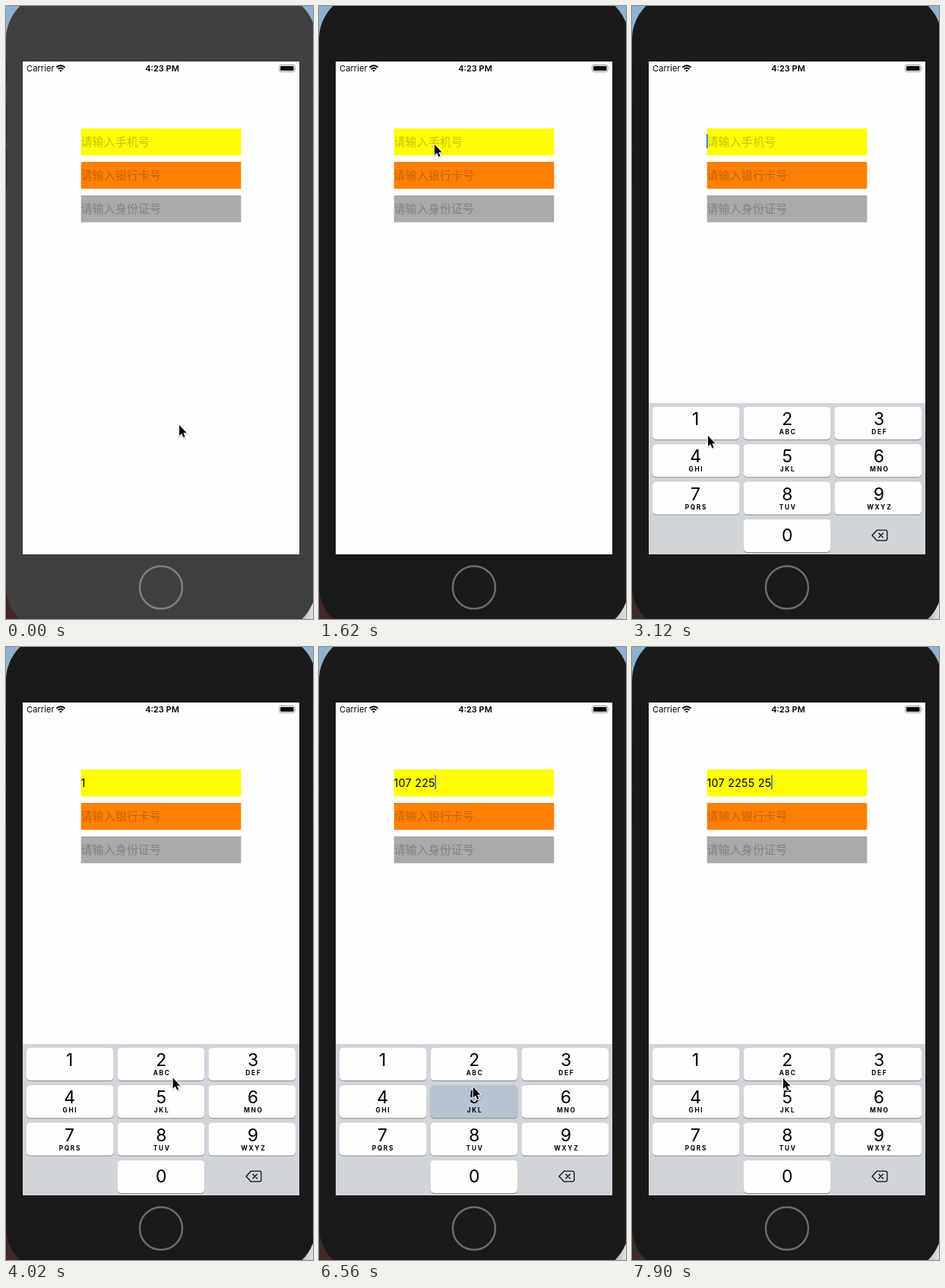
An HTML page for the animation above (8000 ms loop, 404x806 px).

```html
<!DOCTYPE html>
<html lang="zh">
<head>
<meta charset="utf-8">
<title>Number pad</title>
<style>
html, body { margin: 0; width: 100%; height: 100%; overflow: hidden; background: #404040; }
svg { display: block; width: 100vw; height: 100vh; }
text { font-family: Inter, Roboto, sans-serif; white-space: pre; }
.hint { font: 300 15.1px "Noto Sans CJK SC", "Noto Sans CJK", sans-serif; fill: #000019; fill-opacity: .24; }
.digit { font-size: 23px; text-anchor: middle; }
.letters { font-size: 8.3px; font-weight: 700; letter-spacing: 1.7px; text-anchor: middle; }
</style>
</head>
<body>
<svg id="stage" viewBox="0 0 404 806">
  <defs>
    <linearGradient id="floor"><stop offset=".9" stop-color="#aaa"/><stop offset="1" stop-color="#e0e0e0"/></linearGradient>
    <clipPath id="screen"><rect x="22" y="73" width="364" height="648"/></clipPath>
  </defs>
  <rect width="404" height="403" fill="#8fb2d0"/>
  <rect y="403" width="202" height="403" fill="#3f2a25"/>
  <rect x="202" y="403" width="202" height="403" fill="url(#floor)"/>
  <path d="M374 803.500H387.500V795" fill="none" stroke="#777"/>
  <rect id="body" y="-18" width="408" height="842" rx="62"/>
  <path d="M.5 72V102M.5 127V181M.5 187V240" stroke="#000" stroke-opacity=".3"/>
  <circle id="home" cx="204" cy="764.500" r="28" fill="none" stroke-width="2.500"/>
  <g clip-path="url(#screen)">
    <rect x="22" y="73" width="364" height="648" fill="#fefefe"/>
    <text x="27" y="86" font-size="11" letter-spacing=".1">Carrier</text>
    <g fill="none" stroke="#000" stroke-width="1.900">
      <path d="M66.500 80.700Q72 75.700 77.500 80.700M68.600 83.100Q72 80.100 75.400 83.100"/>
      <path d="M70.300 84.700Q72 83.300 73.700 84.700L72 86.700z" fill="#000" stroke="none"/>
    </g>
    <text x="205.500" y="86" font-size="11" font-weight="600" text-anchor="middle">4:23 PM</text>
    <rect x="359.500" y="77.500" width="20.500" height="9" rx="2.300" fill="none" stroke="#999"/>
    <rect x="361" y="79" width="17.500" height="6" rx="1"/>
    <path d="M381 80.300Q382.600 82 381 83.700z" fill="#999"/>
    <g id="fields"></g>
    <text id="typed" x="98.500" y="183.500" font-size="14.300" letter-spacing=".25"></text>
    <rect id="caret" y="168.500" width="1.700" height="18.500" fill="#4a6cd8"/>
    <g id="pad">
      <rect x="22" y="522" width="364" height="200" fill="#d1d4d9"/>
      <g id="keys"></g>
      <g fill="none" stroke="#111" stroke-width="1.300" stroke-linejoin="round" stroke-linecap="round">
        <path d="M322.300 689.200H333.500Q335.800 689.200 335.800 691.500V700.500Q335.800 702.800 333.500 702.800H322.300L316 696z"/>
        <path d="M324.800 693.200l5.600 5.600m0-5.600l-5.600 5.600"/>
      </g>
    </g>
  </g>
  <g id="pointer">
    <path d="M0 0V14L3.200 11 5.500 16.200 7.600 15.300 5.400 10.200H9.600z" transform="translate(.4 1)" stroke="#000" stroke-width="2" opacity=".18"/>
    <path d="M0 0V14L3.200 11 5.500 16.200 7.600 15.300 5.400 10.200H9.600z" stroke="#fff" stroke-width="2" stroke-linejoin="round" paint-order="stroke"/>
  </g>
</svg>
<script>
const LOOP = 8000, STEP = 149.5, FOCUS = 1400, PAD_IN = 1650;
const NUMBER = '107225525';
const $ = id => document.getElementById(id);

function add(parent, tag, attrs, text = '') {
  const el = document.createElementNS('http://www.w3.org/2000/svg', tag);
  for (const k in attrs) el.setAttribute(k, attrs[k]);
  el.textContent = text;
  return parent.appendChild(el);
}

[['#ff0', '请输入手机号'], ['#ff8000', '请输入银行卡号'], ['#aaa', '请输入身份证号']].forEach(([fill, hint], i) => {
  const y = 161 + 44 * i;
  add($('fields'), 'rect', { x: 98.7, y, width: 210.6, height: 35.4, fill });
  add($('fields'), 'text', { x: 98.5, y: y + 22.7, class: 'hint' }, hint);
});
const phoneHint = $('fields').children[1];

const keys = {};
' ABC DEF GHI JKL MNO PQRS TUV WXYZ '.split(' ').forEach((letters, i) => {
  const zero = i === 9, label = (i + 1) % 10, col = zero ? 1 : i % 3;
  const x = 27 + col * 119.7, y = 527 + Math.floor(i / 3) * 49.3, mid = 83.6 + col * 120.7;
  const size = { x, width: 114.6, height: 43, rx: 5 };
  add($('keys'), 'rect', { ...size, y: y + 1, fill: '#898b8f' });
  keys[label] = add($('keys'), 'rect', { ...size, y });
  add($('keys'), 'text', { x: mid, y: y + (zero ? 29.3 : 24), class: 'digit' }, label);
  add($('keys'), 'text', { x: mid + .8, y: y + 36, class: 'letters' }, letters);
});

// Three slow taps, then a steady alternation of two keys.
const RUN = 5810, BEAT = 350;
const taps = [...NUMBER].map((_, i) => i < 3
  ? { at: [3120, 4620, 5070][i], key: [1, 7, 6][i] }
  : { at: RUN + BEAT * (i - 3), key: i % 2 ? 5 : 2 });
const END = taps[taps.length - 1].at;

// Pointer moves: [from, to, x, y]
const moves = [
  [300, 1200, 152, 182], [2400, 3000, 100, 565], [3200, 3950, 225, 564],
  [3950, 4470, 84, 628], [4620, 5070, 300, 600], [5070, 5370, 202, 597], [5400, RUN, 203, 579]
];

const ease = u => u * u * (3 - 2 * u);
const clamp = (v, a, b) => Math.min(b, Math.max(a, v));

function pointerAt(t) {
  let x = 228, y = 551;
  for (const [from, to, tx, ty] of moves) {
    const e = ease(clamp((t - from) / (to - from), 0, 1));
    x += (tx - x) * e;
    y += (ty - y) * e;
  }
  const sway = Math.cos(Math.PI * (clamp(t, RUN, END) - RUN) / BEAT);
  return [x + 2 * (sway - 1), y + 6 * (sway - 1)];
}

// Pictures are held for one step, as in a screen recording.
const hold = t => Math.max(0, 1320 + STEP * Math.floor((t - 1320) / STEP));

const group = s => [s.slice(0, 3), s.slice(3, 7), s.slice(7)].filter(Boolean).join(' ');

function draw(time) {
  const t = hold(time), active = t >= FOCUS;
  $('body').setAttribute('fill', active ? '#1a1a1a' : '#404040');
  $('home').setAttribute('stroke', active ? '#6c6c6c' : '#808080');

  // Critically damped spring
  const s = Math.max(0, t - PAD_IN) / 54;
  const drop = 200 * (1 + s) * Math.exp(-s);
  $('pad').setAttribute('transform', `translate(0 ${Math.round(drop)})`);

  const done = taps.filter(p => p.at <= t), last = done[done.length - 1];
  const text = group(NUMBER.slice(0, done.length));
  $('typed').textContent = text;
  phoneHint.style.display = text ? 'none' : '';
  for (const k in keys) {
    const down = last && last.key == k && t - last.at < STEP;
    keys[k].setAttribute('fill', down ? '#b6c3d3' : '#fefefe');
  }

  const since = t - (last ? last.at : PAD_IN);
  $('caret').style.display = since >= 0 && since % 1000 < 500 ? '' : 'none';
  $('caret').setAttribute('x', 98 + (text ? $('typed').getComputedTextLength() : 0));

  $('pointer').setAttribute('transform', `translate(${pointerAt(t)})`);
}

const start = performance.now();
function tick() {
  draw((performance.now() - start) % LOOP);
  requestAnimationFrame(tick);
}
tick();
</script>
</body>
</html>
```
